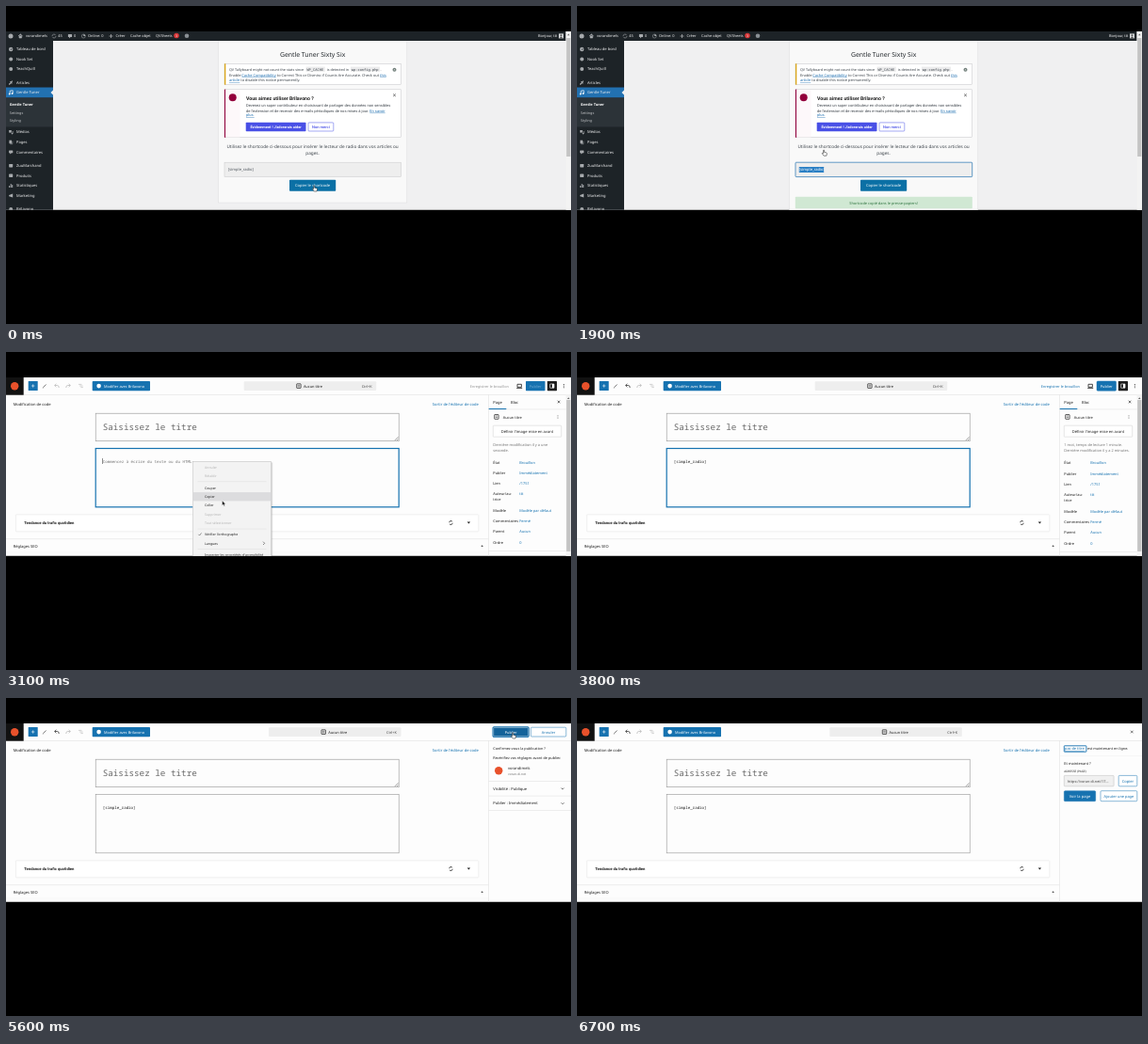
Recreate the animation shown at these times as an HTML page. Size 600 by 338 pixels, loop 6800 ms.

```html
<!DOCTYPE html>
<html lang="fr">
<head>
<meta charset="utf-8">
<title>Insertion d'un shortcode</title>
<style>
html, body { margin: 0; width: 100%; height: 100%; overflow: hidden; background: #000; }
svg { display: block; width: 100vw; height: 100vh; }
text { font-family: "Noto Sans", "Open Sans", sans-serif; white-space: pre; text-rendering: geometricPrecision; }
.r { font-family: Roboto, sans-serif; }
.m { font-family: "Noto Sans Mono", "DejaVu Sans Mono", monospace; }
</style>
</head>
<body>
<svg id="stage" viewBox="0 0 600 338" preserveAspectRatio="none"></svg>
<script>
const LOOP = 6800, BLUE = '#1672b0', INK = '#1e1e1e', GREY = '#757575', FAINT = '#b4b4b4';

// Drawing helpers; text is placed by its vertical middle.
const text = (x, y, s, fill = INK, { size = 4.06, weight = 400, font = '', anchor = 'start', more = '' } = {}) =>
  `<text x="${x}" y="${y + size * .36}" fill="${fill}" font-size="${size}" font-weight="${weight}" class="${font}" text-anchor="${anchor}" ${more}>${s}</text>`;
const mid = (x, y, s, fill, o) => text(x, y, s, fill, { ...o, anchor: 'middle' });
const rect = (x, y, w, h, fill, stroke = 'none', r = 0, sw = .5) =>
  `<rect x="${x}" y="${y}" width="${w}" height="${h}" rx="${r}" fill="${fill}" stroke="${stroke}" stroke-width="${sw}"/>`;
const dot = (x, y, r, fill, stroke = 'none') =>
  `<circle cx="${x}" cy="${y}" r="${r}" fill="${fill}" stroke="${stroke}" stroke-width=".5"/>`;
const path = (d, stroke = INK, fill = 'none', sw = .6) =>
  `<path d="${d}" stroke="${stroke}" fill="${fill}" stroke-width="${sw}"/>`;
const line = (x, y, w, c = '#ddd') => rect(x, y, w, .5, c);
const at = (x, y, s) => `<g transform="translate(${x} ${y})">${s}</g>`;
const group = (id, s) => `<g id="${id}">${s}</g>`;
const button = (x, y, w, h, s, solid = true, o) =>
  rect(x, y, w, h, solid ? BLUE : '#fff', BLUE, 1) + mid(x + w / 2, y + h / 2, s, solid ? '#fff' : BLUE, o);
const cross = (x, y, r = 1.3) => path(`M${x - r} ${y - r}l${2 * r} ${2 * r}m0 ${-2 * r}l${-2 * r} ${2 * r}`);
const scrollbar = (y, top, end) => rect(594.6, y, 5.4, 217 - y, '#f3f3f3') +
  path(`M596 ${y + 4.2}l1.3-1.7 1.3 1.7z`, 'none', '#666') + rect(595.2, top, 4.2, end - top, '#c4c4c4');

// ---- Plugin settings page ----
const ICON = '#a7aaad';
const icons = {
  gauge: dot(0, 0, 2.2, ICON) + path('M0 1L1-1', '#1d2327'),
  disc: dot(0, 0, 2, ICON),
  box: rect(-2, -1.7, 4, 3.4, ICON, 'none', .6),
  pin: path('M-2 2L0 0M-.8-1.2L1.2.8M0-.2L1.6-1.8', ICON, 'none', 1.2),
  note: path('M-1 1.5V-1.8L2-2.2V1', '#fff', 'none', .7) + dot(-1.5, 1.5, .9, '#fff') + dot(1.4, 1, .9, '#fff'),
  media: rect(-2, -2, 2.6, 2.6, ICON) + path('M2-1V1.6', ICON, 'none', .7) + dot(1.3, 1.6, .8, ICON),
  pages: rect(-1.8, -2, 2.6, 3.4, ICON) + path('M1.6-1V2H-1', ICON),
  talk: rect(-2.1, -1.9, 4.2, 2.9, ICON, 'none', .6) + path('M-1 .8V2.3L.8.8z', 'none', ICON),
  bars: path('M-1.5 2V0M0 2V-2M1.5 2V-1', ICON, 'none', 1),
  horn: path('M-2-.6L2-2V2L-2 .6z', 'none', ICON)
};
const menu = [
  [46, 'Tableau de bord', 'gauge'], [56.5, 'Nook Set', 'disc'], [67, 'TeachQuill', 'disc'],
  [81.5, 'Articles', 'pin'], [92, 'Gentle Tuner', 'note'], [134, 'Médias', 'media'],
  [144.7, 'Pages', 'pages'], [155.3, 'Commentaires', 'talk'], [169.7, 'ZuuMarchand', 'box'],
  [180.3, 'Produits', 'box'], [191, 'Statistiques', 'bars'], [201.6, 'Marketing', 'horn'], [216, 'Brilavono', 'disc']
];
const sidebar = rect(0, 37, 50, 180, '#1d2327') + rect(0, 86.5, 50, 11, '#2271b1') + rect(0, 97.5, 50, 31, '#2c3338') +
  path('M50 89.5L47.5 92L50 94.5z', 'none', '#f0f0f1') +
  menu.map(([y, s, i]) => at(5.2, y, icons[i]) + text(11, y, s, '#f0f0f1')).join('') +
  text(3.8, 104.2, 'Gentle Tuner', '#fff', { weight: 600, size: 3.9 }) +
  text(3.8, 113.3, 'Settings', '#c3c4c7', { size: 3.8 }) + text(3.8, 122, 'Styling', '#c3c4c7', { size: 3.8 });

const bar = rect(0, 27, 594.6, 10, '#1d2327') + dot(5, 32, 2.5, ICON) +
  path('M13 32L15.3 29.8L17.6 32M14 31.6V34H16.6V31.6', ICON, ICON) +
  path('M49 32a2 2 0 0 1 3.8-.8M53 32a2 2 0 0 1-3.8 .8', ICON) +
  at(68, 32, icons.talk) + dot(82.3, 32, 2, 'none', ICON) + path('M82.3 32V30A2 2 0 0 1 84.3 32z', 'none', ICON) +
  path('M109.5 32h4m-2-2v4', ICON, 'none', .8) +
  [[21, 'vorandimels'], [55.2, '45'], [72, '0'], [87, 'Online: 0'], [116.5, 'Créer'], [132, 'Cache objet'], [159, 'QVSheets'], [565, 'Bonjour, ttt']]
    .map(([x, s]) => text(x, 32, s, '#f0f0f1', { size: 3.95 })).join('') +
  dot(181, 31.5, 2.8, '#d63638') + mid(181, 31.5, '3', '#fff', { size: 3.4 }) + dot(192, 31.7, 2.3, '#8a9095') +
  rect(587, 29.4, 5, 5, '#d5d8da') + dot(589.5, 31.2, 1, '#555') + path('M587.8 34.4q1.7-3.6 3.4 0z', 'none', '#555');

const small = { size: 3.9 }, link = { size: 3.9, more: 'text-decoration="underline"' };
const code = (x, w, s) => rect(x, 64.6, w, 5.2, '#ebebec') + text(x + .8, 67.2, s, '#3c434a', { size: 3.7, font: 'm' });
const statNotice = rect(232, 61.5, 187.7, 22, '#fff', '#c3c4c7') + rect(232, 61.3, 1.3, 22.4, '#dba617') +
  text(237, 67.2, 'QV Tallyboard might not count the stats since', '#3c434a', { size: 3.72 }) + code(318.6, 20.2, 'WP_CACHE') +
  text(340.8, 67.2, 'is detected in', '#3c434a', { size: 3.72 }) + code(366, 31, 'wp-config.php') + text(397.6, 67.2, '.', '#3c434a', small) +
  text(237, 73.1, `Enable <tspan fill="#2271b1" text-decoration="underline">Cache Compatibility</tspan> to Correct This or Dismiss if Counts Are Accurate. Check out <tspan fill="#2271b1" text-decoration="underline">this</tspan>`, '#3c434a', small) +
  text(237, 78.9, '<tspan fill="#2271b1" text-decoration="underline">article</tspan> to disable this notice permanently.', '#3c434a', small) +
  dot(412.5, 67.8, 2, '#6f7d78') + path('M411.7 67l1.6 1.6m0-1.6l-1.6 1.6', '#fff', 'none', .5);

const rob = { font: 'r' }, robLink = { font: 'r', more: 'text-decoration="underline"' };
const promo = rect(232, 88.8, 187.7, 50.8, '#fff', '#c3c4c7') + rect(232, 88.6, 1.2, 51.2, '#93003c') +
  rect(233.2, 89, 15.3, 50.4, '#fdf8fa') + dot(240.7, 97.2, 4, '#93003c') +
  text(255, 98.2, 'Vous aimez utiliser Brilavono ?', INK, { size: 5.2, font: 'r', weight: 700 }) +
  text(255, 106, 'Devenez un super contributeur en choisissant de partager des données non sensibles', '#3c434a', rob) +
  text(255, 111.2, "de l'extension et de recevoir des e-mails périodiques de nos mises à jour. <tspan fill=\"#2271b1\" text-decoration=\"underline\">En savoir</tspan>", '#3c434a', rob) +
  text(255, 116, 'plus.', '#2271b1', robLink) +
  rect(254.7, 123.7, 63.8, 9.5, '#4950e6', 'none', .8) +
  mid(286.6, 128.4, "Évidemment ! J'adorerais aider", '#fff', { font: 'r', weight: 700, size: 3.95 }) +
  rect(321, 123.9, 26.8, 9.1, '#fff', '#4950e6', .8) +
  mid(334.4, 128.4, 'Non merci', '#4950e6', { font: 'r', weight: 500 }) + cross(412.5, 94.8);

const settings = rect(0, 27, 600, 190, '#f0f0f1') +
  group('card', rect(225.5, 33, 200.3, 176, '#f9f9f9', '#dcdcde')) +
  group('cardLong', rect(225.5, 33, 200.3, 190, '#f9f9f9', '#dcdcde')) +
  mid(325.6, 51.3, 'Gentle Tuner Sixty Six', '#23282d', { size: 6.85 }) + statNotice + promo +
  mid(325.6, 149, 'Utilisez le shortcode ci-dessous pour insérer le lecteur de radio dans vos articles ou', '#3c434a', { size: 4.69 }) +
  mid(325.6, 156.7, 'pages.', '#3c434a', { size: 4.69 }) +
  group('plain', rect(232, 166.2, 187.7, 15.4, '#eee', '#c9c9cb') + text(236, 174, '[simple_radio]', '#50575e')) +
  group('copied', rect(232, 166.2, 187.7, 15.4, '#eee', '#2271b1', .8, .7) + rect(235.8, 171, 26.4, 6, '#2a7fc4') +
    text(236, 174, '[simple_radio]', '#fff') + rect(231.8, 202.8, 188, 12.4, '#d0e8d3', 'none', .8) +
    mid(325.6, 209.2, 'Shortcode copié dans le presse-papiers!', '#2f7440', small)) +
  rect(301, 184.8, 49.2, 12, '#0b70a5', 'none', .8) + mid(325.6, 190.9, 'Copier le shortcode', '#fff') +
  bar + sidebar + scrollbar(27, 34, 160);

// ---- Page editor ----
const arrows = (x, c, dir) => at(x, 36, `<g transform="scale(${dir} 1)">${path('M-.6-2.2L-2.4-.5L-.6 1.2M-2.2-.5H.6Q2.4-.3 2.2 2', c, 'none', .7)}</g>`);
const searchBar = rect(0, 31.3, 140.5, 9.8, '#eee', 'none', 1) + rect(56, 33.8, 4.4, 4.6, 'none', INK, .4, .7) +
  path('M57 35.3h2.4m-2.4 1.5h2.4', INK, 'none', .5) + text(63.2, 36.2, 'Aucun titre', INK, { size: 3.9 }) +
  text(125, 36.2, 'Ctrl+K', '#444', { size: 3.8 });
const editor = rect(0, 27, 600, 190, '#fdfdfd') + line(0, 45.4, 600) + rect(0, 27, 18.7, 18.7, '#111') + dot(9.2, 36.2, 4.2, '#e8512b') +
  rect(23.7, 31, 10, 10, BLUE, 'none', .6) + path('M27 36h3.4m-1.7-1.7v3.4', '#fff') +
  path('M39.6 37.6L42.6 34.5M39.6 37.6l-.3 .8', GREY, 'none', 1) + arrows(66, FAINT, -1) +
  path('M77 34.4h3.4M78.2 36h3.4M79.4 37.6h2.4', FAINT) +
  group('undoOff', arrows(54, FAINT, 1)) + group('undoOn', arrows(54, INK, 1)) +
  rect(91.7, 31, 61.3, 10.2, BLUE, 'none', .8) + dot(98.6, 36.1, 2.3, '#fff') +
  text(104, 36.2, 'Modifier avec Brilavono', '#fff', { size: 3.9 }) +
  group('search', searchBar) +
  text(7.7, 55.2, 'Modification de code') + text(501.7, 55.2, "Sortir de l'éditeur de code", BLUE, { anchor: 'end' }) +
  rect(95.2, 65.2, 322, 29.5, '#fdfdfd', '#949494', 0, .6) + path('M412.8 94l3.8-3.8m-1.6 3.8l1.6-1.6', '#666') +
  text(102.7, 80, 'Saisissez le titre', '#6b6b6b', { size: 9.28, font: 'm' }) +
  group('blur', rect(95.2, 102.5, 322, 62.3, '#fdfdfd', '#949494', 0, .6)) +
  group('focus', rect(95.2, 102.5, 322, 62.3, '#fdfdfd', BLUE, 0, 1.2)) +
  group('hint', text(102.7, 116, 'Commencez à écrire du texte ou du HTML', GREY, { size: 4.17, font: 'm' })) +
  group('pasted', text(102.7, 116, '[simple_radio]', INK, { size: 4.17, font: 'm' })) +
  group('caret', rect(102.4, 113, .5, 6, INK)) +
  rect(10.4, 172.8, 491.4, 18, '#fff', '#e0e0e0', .6) +
  text(19.2, 181.7, 'Tendance du trafic quotidien', INK, { font: 'r', weight: 700, size: 4.15 }) +
  path('M470.7 181.2a1.8 1.8 0 0 1 3.2-1M474.2 181.8a1.8 1.8 0 0 1-3.2 1', INK, 'none', .8) +
  path('M489.7 180.6h3.4l-1.7 2z', 'none', INK) + line(0, 198.6, 512.4) +
  text(7.7, 206.2, 'Réglages SEO') + path('M504.4 206.8h2.4l-1.2-1.6z', 'none', INK) + line(0, 212.7, 512.4, '#eee') +
  rect(512.2, 45.4, .5, 171.6, '#ddd');

const field = (y, label, value) => text(517.3, y, label, INK, { size: 3.9 }) + text(545.3, y, value, BLUE, { size: 3.9 });
const fields = field(128.3, 'Publier', 'Immédiatement') + field(139.5, 'Lien', '/1751') + field(150.8, 'Auteur/au-', 'ttt') +
  text(517.3, 156.8, 'trice', INK, { size: 3.9 }) + field(168.3, 'Modèle', 'Modèle par défaut') +
  field(179.6, 'Commentaires', 'Fermé') + field(191, 'Parent', 'Aucun') + field(202.2, 'Ordre', '0') + line(512.7, 211, 82);
const page = text(517.3, 53.6, 'Page', INK, { weight: 500 }) + text(536, 53.6, 'Bloc', INK, { weight: 500 }) + cross(587, 53) +
  line(512.7, 60.7, 82) + rect(512.7, 60, 18.6, 1, BLUE) +
  rect(518.7, 66.5, 4.4, 4.8, 'none', INK, .4, .7) + path('M519.7 68h2.4m-2.4 1.6h2.4', INK, 'none', .5) +
  text(527.7, 69.3, 'Aucun titre', INK, { weight: 500, size: 3.9 }) + [67.4, 69, 70.6].map(y => dot(586, y, .4, INK)).join('') +
  rect(517.3, 78.2, 72.4, 12, '#fff', '#ccc', .6) + mid(553.5, 84.3, "Définir l'image mise en avant") +
  field(117.2, 'État', 'Brouillon') + scrollbar(45.7, 51, 212) +
  path('M543 34.3h4.4v3h-4.4zM542.2 38.4h6', INK, 'none', .8) +
  rect(574.8, 31, 10.2, 10.2, INK, 'none', .6) + rect(577.7, 34, 4.4, 4.2, 'none', '#fff', .3, .6) + rect(580, 34, 2, 4.2, '#fff') +
  [34.4, 36.1, 37.8].map(y => dot(592.3, y, .5, INK)).join('') +
  group('clean', text(533.8, 36.2, 'Enregistrer le brouillon', '#949494', { anchor: 'end', size: 3.8 }) +
    rect(552, 31, 20.5, 10.2, BLUE, 'none', .6) + mid(562.2, 36.1, 'Publier', '#6da9d2', { size: 3.9 }) +
    text(517.3, 98.2, 'Dernière modification il y a une', GREY, { size: 3.95 }) + text(517.3, 104.4, 'seconde.', GREY, { size: 3.95 }) + fields) +
  group('dirty', text(533.8, 36.2, 'Enregistrer le brouillon', BLUE, { anchor: 'end', size: 3.8 }) + button(552, 31, 20.5, 10.2, 'Publier', true, { size: 3.9 }) +
    text(517.3, 98.5, '1 mot, temps de lecture 1 minute.', GREY, { size: 3.9 }) +
    text(517.3, 105, 'Dernière modification il y a 2 minutes.', GREY, { size: 3.9 }) + at(0, 1, fields));

const chevron = y => path(`M589.6 ${y - .7}l1.5 1.5 1.5-1.5`);
const confirm = rect(517, 30.8, 38.2, 10.6, '#14639a', BLUE, 1, 1) + rect(517.7, 31.5, 36.8, 9.2, 'none', '#fff', .6, .4) +
  mid(536.2, 36.2, 'Publier', '#fff', small) + button(557.4, 31.2, 37.4, 9.8, 'Annuler', false, small) +
  text(517.3, 53.8, 'Confirmez-vous la publication ?', INK, { weight: 500, size: 3.8 }) +
  text(517.3, 64, 'Revérifiez vos réglages avant de publier.', INK, { size: 3.85 }) +
  dot(523.2, 77.2, 4.2, '#e8512b') + text(533, 74.6, 'vorandimels') + text(533, 80.4, 'voran-di.net', GREY, { size: 3.4 }) +
  line(512.7, 88.2, 88) + text(517.3, 96.3, 'Visibilité : Publique') + chevron(96.3) +
  line(512.7, 103.8, 88) + text(517.3, 112, 'Publier : Immédiatement') + chevron(112) + line(512.7, 119.4, 88);
const done = cross(589.3, 36) + rect(517.3, 50.8, 23.6, 6.4, 'none', BLUE, .4, .9) +
  text(518, 54, 'pas de titre', BLUE, { size: 3.9, more: 'text-decoration="underline"' }) + text(542, 54, 'est maintenant en ligne.', INK, { size: 3.8 }) +
  line(512.7, 61, 88, '#eee') + text(517.3, 69.6, 'Et maintenant ?', INK, { weight: 500, size: 3.9 }) +
  text(517.3, 77.6, 'ADRESSE (PAGE)', INK, { size: 3.1, weight: 500 }) +
  rect(517.3, 82.4, 52.8, 11.4, '#f0f0f0', '#bbb', .6) + text(521, 88.2, 'https://voran-di.net/17…', '#444', { size: 3.8 }) +
  button(575.2, 82.4, 19.6, 11.4, 'Copier', false) + button(517.3, 98.7, 33.4, 11, 'Voir la page') +
  button(556, 98.7, 38.8, 11, 'Ajouter une page', false, small);

const item = (y, s, c = INK) => text(211, y, s, c, { size: 3.5 });
const popup = rect(199.2, 117.4, 84, 106, '#0002') + rect(198.3, 116.3, 83.4, 108, '#f3f3f3', '#bbb') +
  group('hover', rect(198.8, 0, 82.4, 9.3, '#dcdcde')) +
  item(122.9, 'Annuler', FAINT) + item(132.2, 'Rétablir', FAINT) + item(144.4, 'Couper') + item(153.7, 'Copier') + item(163, 'Coller') +
  item(172.3, 'Supprimer', FAINT) + item(181.6, 'Tout sélectionner', FAINT) +
  path('M204.4 193.8l1.1 1.2 2-2.6', '#555') + item(194, "Vérifier l'orthographe") + item(203.3, 'Langues') +
  path('M273 201.6l1.7 1.7-1.7 1.7', INK, 'none', .5) + [137.6, 187.8, 209].map(y => line(203.5, y, 73)).join('') +
  item(215.8, "Inspecter les propriétés d'accessibilité");

const arrow = path('M0 0V5.2L1.3 4.1L2.1 6L3 5.6L2.2 3.8H3.8z', '#fff', '#111', .45);
const hand = path('M-.2 0q.8-.5 .9 .4V2.2L3 2.8q.7 .3 .5 1.2L3 6H.2L-1.6 3.6q0-.8 .9-.3L-.4 3.6z', '#111', '#fff', .5);

const stage = document.getElementById('stage');
stage.innerHTML = '<clipPath id="screen"><rect y="27" width="600" height="189.7"/></clipPath>' +
  rect(0, 0, 600, 338, '#000') + '<g clip-path="url(#screen)">' + group('settings', settings) +
  group('editor', editor + group('page', page) + group('confirm', confirm) + group('done', done) + group('popup', popup)) +
  group('arrow', arrow) + group('hand', hand) + '</g>';
const parts = Object.fromEntries([...stage.querySelectorAll('g[id]')].map(g => [g.id, g]));

// Visible spans in ms for each changing part.
const COPY = 500, EDIT = 2000, FOCUS = 2500, MENU = 2800, PASTE = 3300, ASK = 5200, LIVE = 6200;
const spans = {
  settings: [0, EDIT], card: [0, COPY], plain: [0, COPY], cardLong: [COPY, EDIT], copied: [COPY, EDIT],
  editor: [EDIT, LOOP], blur: [[EDIT, FOCUS], [ASK, LOOP]], focus: [FOCUS, ASK], caret: [FOCUS, PASTE],
  hint: [EDIT, PASTE], pasted: [PASTE, LOOP], undoOff: [EDIT, PASTE], undoOn: [PASTE, LOOP],
  clean: [EDIT, PASTE], dirty: [PASTE, ASK], page: [EDIT, ASK], confirm: [ASK, LIVE], done: [LIVE, LOOP],
  popup: [MENU, PASTE], arrow: [[MENU, PASTE], [4300, 5000]], hand: [[0, EDIT], [5000, LIVE]]
};
// Pointer stops: time, x, y.
const stops = [[0, 327, 191], [400, 327, 191], [1100, 326, 190.5], [2700, 198, 116], [2800, 198, 116], [3100, 229.5, 158],
  [3250, 222, 163], [4000, 240, 150], [4800, 574.5, 42], [5000, 563, 36], [5200, 563, 36], [5500, 538, 37], [LOOP, 538, 37]];

const ease = u => u * u * (3 - 2 * u);
function pointer(t) {
  const i = stops.findIndex(s => s[0] > t), [t0, x0, y0] = stops[i - 1], [t1, x1, y1] = stops[i];
  const u = ease((t - t0) / (t1 - t0));
  return [x0 + (x1 - x0) * u, y0 + (y1 - y0) * u];
}

function draw(now) {
  const t = now % LOOP;
  for (const id in spans) {
    const on = [spans[id]].flat(2).some((a, i, all) => i % 2 === 0 && t >= a && t < all[i + 1]);
    parts[id].style.display = on ? '' : 'none';
  }
  const [x, y] = t < EDIT || t >= 2700 ? pointer(t) : [198, 116];
  for (const id of ['arrow', 'hand']) parts[id].setAttribute('transform', `translate(${x} ${y})`);
  const row = y < 140 ? -40 : y < 149 ? 139.8 : y < 160 ? 149.1 : 158.4;
  parts.hover.setAttribute('transform', `translate(0 ${row})`);
  parts.search.setAttribute('transform', `translate(${t < ASK ? 252.7 : t < LIVE ? 279 : 268.3} 0)`);
  requestAnimationFrame(draw);
}
const start = performance.now();
requestAnimationFrame(function first() { draw(0); });
draw = (base => now => base(Math.max(0, now - start)))(draw);
</script>
</body>
</html>
```
